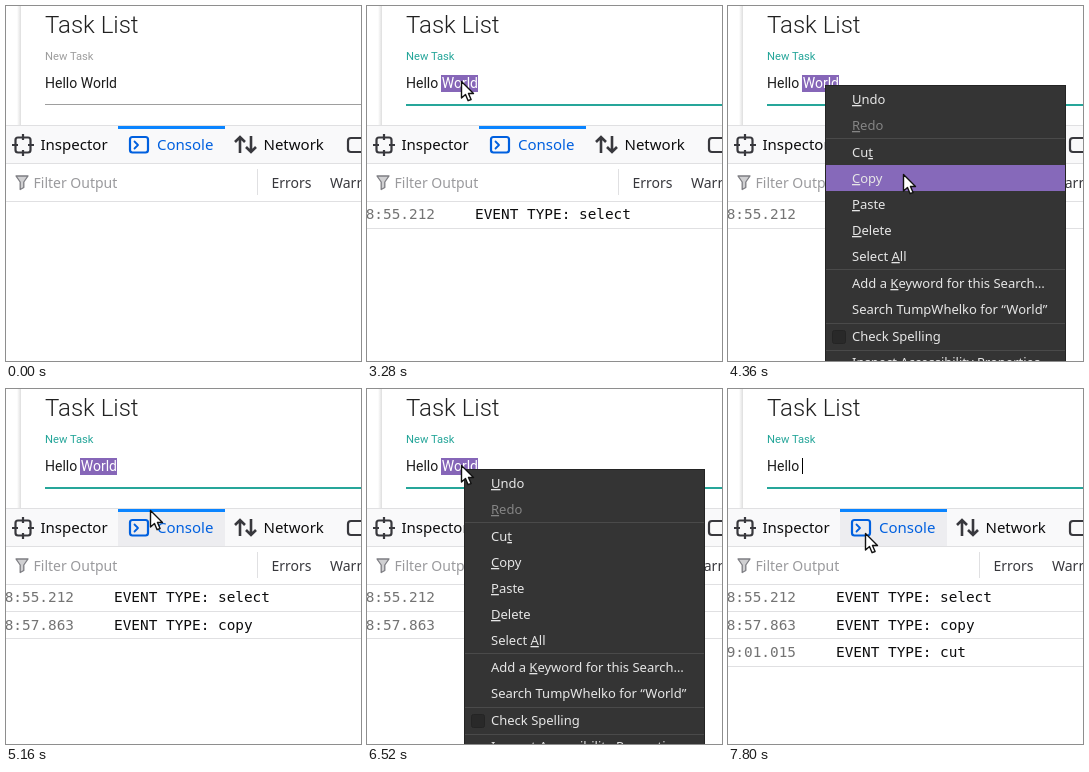
These frames come from a looping animation (355 px wide and 355 px high, 8 s). An HTML page:

```html
<!DOCTYPE html>
<html lang="en">
<head>
<meta charset="utf-8">
<title>Clipboard events</title>
<style>
  html, body { margin: 0; width: 100%; height: 100%; overflow: hidden; background: #fff; }
  svg { display: block; width: 100vw; height: 100vh; }
  text { white-space: pre; }
  .page { font-family: Roboto, sans-serif; }
  .ui { font-family: "Noto Sans", sans-serif; }
  .log { font: 14.4px "DejaVu Sans Mono", monospace; }
  .tab { font-size: 15px; fill: #0c0c0d; }
  .bar { font-size: 14px; fill: #38383d; }
  .menu { font-size: 13px; fill: #e6e6e6; }
</style>
</head>
<body>
<svg viewBox="0 0 355 355">
  <defs>
    <linearGradient id="edge">
      <stop offset="0" stop-color="#fff"/>
      <stop offset="1" stop-color="#dedede"/>
    </linearGradient>
  </defs>
  <rect width="355" height="355" fill="#fff"/>

  <g class="page">
    <rect x="11" width="4" height="120" fill="url(#edge)"/>
    <text x="39" y="27" font-size="24" font-weight="300" fill="#212121">Task List</text>
    <text id="label" x="39" y="54" font-size="11.2">New Task</text>
    <rect id="selection" x="74" y="69" width="37" height="17" fill="#8666b8"/>
    <text x="39" y="82" font-size="14" fill="#1c1c1c">Hello <tspan id="word">World</tspan></text>
    <rect id="caret" x="74" y="69" width="1" height="16" fill="#000"/>
    <rect id="line" x="39" y="98" width="316"/>
  </g>

  <g class="ui">
    <rect y="119" width="355" height="39" fill="#f9f9fa"/>
    <rect id="hover" x="112" y="120" width="107" height="37" fill="#ededf0"/>
    <path d="M0 119.5H355M0 157.5H355M0 195.5H355M251.5 163V189" stroke="#e0e0e2"/>
    <rect x="112" y="120" width="107" height="3" fill="#0a84ff"/>
    <g fill="none" stroke="#38383d" stroke-width="2.2">
      <rect x="9.5" y="131.5" width="15" height="15" rx="2.5"/>
      <path d="M17 128V134M17 144V150M6 139H12M22 139H28"/>
      <path d="M234 147V131M229 136L234 131L239 136M245 130V146M240 141L245 146L250 141" stroke-width="2.6"/>
      <rect x="342" y="132" width="18" height="14" rx="3"/>
    </g>
    <g fill="none" stroke="#0060df" stroke-width="2.2" stroke-linecap="round" stroke-linejoin="round">
      <rect x="124" y="131" width="18" height="15.5" rx="2.5"/>
      <path d="M128.5 135.5L132 139L128.5 142.5" stroke-width="1.8"/>
    </g>
    <text class="tab" x="34.5" y="144">Inspector</text>
    <text class="tab" x="151" y="144" style="fill:#0060df">Console</text>
    <text class="tab" x="257.5" y="144">Network</text>
    <path d="M10 170H22L17.8 176V181.5L14.2 183.5V176Z" fill="#d0d0d2" stroke="#7d7d82" stroke-width="1.3" stroke-linejoin="round"/>
    <text class="bar" x="27.5" y="182" style="fill:#9a9a9d">Filter Output</text>
    <text class="bar" x="265.5" y="182">Errors</text>
    <text class="bar" x="324" y="182">Warnings</text>
  </g>

  <g id="logs" class="log"></g>

  <g id="menu" class="ui menu">
    <rect x=".5" y=".5" width="240" height="300" fill="#343434" stroke="#242424"/>
    <rect id="mark" x="1" width="239" height="26" fill="#8669ba"/>
    <path d="M1 53.5H240M1 184.5H240M1 238.5H240M1 265.5H240" stroke="#4a4a4a"/>
    <rect x="7.5" y="245.5" width="13" height="13" rx="2" fill="#292929" stroke="#242424"/>
    <g id="items"></g>
  </g>

  <path id="arrow" d="M0 0V16.5L4 13L6.6 19.2L9.6 18L7 12H12Z" fill="#fff" stroke="#111" stroke-width="1.4" stroke-linejoin="round"/>
  <g id="beam" fill="none" stroke-linecap="square">
    <path d="M-3 -8H-1L0 -7L1 -8H3M0 -7V7M-3 8H-1L0 7L1 8H3M-1.5 1.5H1.5" stroke="#fff" stroke-width="3.4"/>
    <path d="M-3 -8H-1L0 -7L1 -8H3M0 -7V7M-3 8H-1L0 7L1 8H3M-1.5 1.5H1.5" stroke="#000" stroke-width="1.5"/>
  </g>
</svg>
<script>
const LOOP = 8000, STEP = 40;
const $ = id => document.getElementById(id);
const show = (id, on) => $(id).setAttribute('visibility', on ? 'visible' : 'hidden');
const move = (id, x, y) => $(id).setAttribute('transform', `translate(${x} ${y})`);
const clamp = v => Math.max(0, Math.min(1, v));
const ease = v => v * v * (3 - 2 * v);

// Baseline inside the menu and label; an underscore precedes the access key.
const ITEMS = [
  [19, '_Undo'], [45, '_Redo'], [72, 'Cu_t'], [98, '_Copy'], [124, '_Paste'],
  [150, '_Delete'], [176, 'Select _All'], [203, 'Add a _Keyword for this Search…'],
  [229, 'Search TumpWhelko for “World”'], [256, 'Check Spellin_g'],
  [282, 'Inspect Accessibility Properties']
];
const LOGS = [
  [1880, '8:55.212', 'select'],
  [4680, '8:57.863', 'copy'],
  [7800, '9:01.015', 'cut']
];
const MENUS = [
  { from: 3320, full: 3400, to: 4560, gone: 4600, y: 79 },
  { from: 6480, full: 6520, to: 7720, gone: 7760, y: 80 }
];
// Pointer hot spot: time, x, y
const PATH = [
  [280, 52, 15], [560, 86, 38], [800, 110, 72], [1080, 101, 77], [1160, 97, 78],
  [3800, 97, 78], [4360, 178, 171], [4600, 178, 171], [5360, 141, 114],
  [5640, 84, 70], [5800, 84, 70], [6000, 104, 80], [6120, 97, 79],
  [6880, 97, 79], [7200, 140, 147]
];

$('items').innerHTML = ITEMS.map(([y, s]) => {
  const text = s.replace(/_(.)/, '<tspan text-decoration="underline">$1</tspan>');
  return `<text x="27" y="${y}"${s === '_Redo' ? ' fill="#858585"' : ''}>${text}</text>`;
}).join('');

$('logs').innerHTML = LOGS.map(([, time, type], i) => {
  const y = 213 + Math.round(i * 27.5);
  return `<g id="log${i}"><text x="68" y="${y}" text-anchor="end" fill="#737373">${time}</text>
    <text x="108" y="${y}" fill="#0c0c0d">EVENT TYPE: ${type}</text>
    <path d="M0 ${222.5 + Math.round(i * 27.4)}H355" stroke="#e0e0e2"/></g>`;
}).join('');

function pointer(t) {
  const i = PATH.findIndex(p => p[0] > t);
  if (i < 0) return PATH[PATH.length - 1].slice(1);
  if (i === 0) return PATH[0].slice(1);
  const [t0, x0, y0] = PATH[i - 1], [t1, x1, y1] = PATH[i];
  const k = ease((t - t0) / (t1 - t0));
  return [x0 + (x1 - x0) * k, y0 + (y1 - y0) * k];
}

function render(t) {
  const [x, y] = pointer(t);
  const menu = MENUS.find(m => t >= m.from && t < m.gone);
  const cut = t >= 7760;

  const k = clamp((t - 1680) / 200);
  const tint = [38, 166, 154].map(c => Math.round(158 + (c - 158) * k));
  $('label').setAttribute('fill', `rgb(${tint})`);
  $('line').setAttribute('fill', `rgb(${tint})`);
  $('line').setAttribute('height', 1 + k);

  const selected = t >= 1840 && !cut;
  show('selection', selected);
  show('word', !cut);
  $('word').setAttribute('fill', selected ? '#fff' : '#1c1c1c');
  show('caret', cut);
  LOGS.forEach(([at], i) => show('log' + i, t >= at));

  show('menu', menu);
  show('mark', false);
  if (menu) {
    move('menu', 97, menu.y);
    $('menu').setAttribute('opacity', t < menu.full || t >= menu.to ? 0.6 : 1);
    const row = ITEMS.find(([b]) => y - menu.y >= b - 18 && y - menu.y < b + 8);
    if (row && x >= 97 && row[1] !== '_Redo') {
      $('mark').setAttribute('y', row[0] - 18);
      show('mark', true);
    }
  }
  show('hover', !menu && t > 4560 && y >= 120 && y < 157 && x > 112 && x < 219);

  const pressed = (t >= 3280 && t < 3400) || (t >= 6400 && t < 6520);
  const overText = y < 100 || (y > 158 && y < 195);
  const beam = overText && !menu && !pressed;
  show('beam', t >= 280 && beam);
  show('arrow', t >= 280 && !beam);
  move('beam', Math.round(x) + 0.5, Math.round(y));
  move('arrow', Math.round(x) - 2.5, Math.round(y) - 2.5);
}

function tick() {
  const t = performance.now() % LOOP;
  render(Math.floor(t / STEP) * STEP);
  requestAnimationFrame(tick);
}
tick();
</script>
</body>
</html>
```
